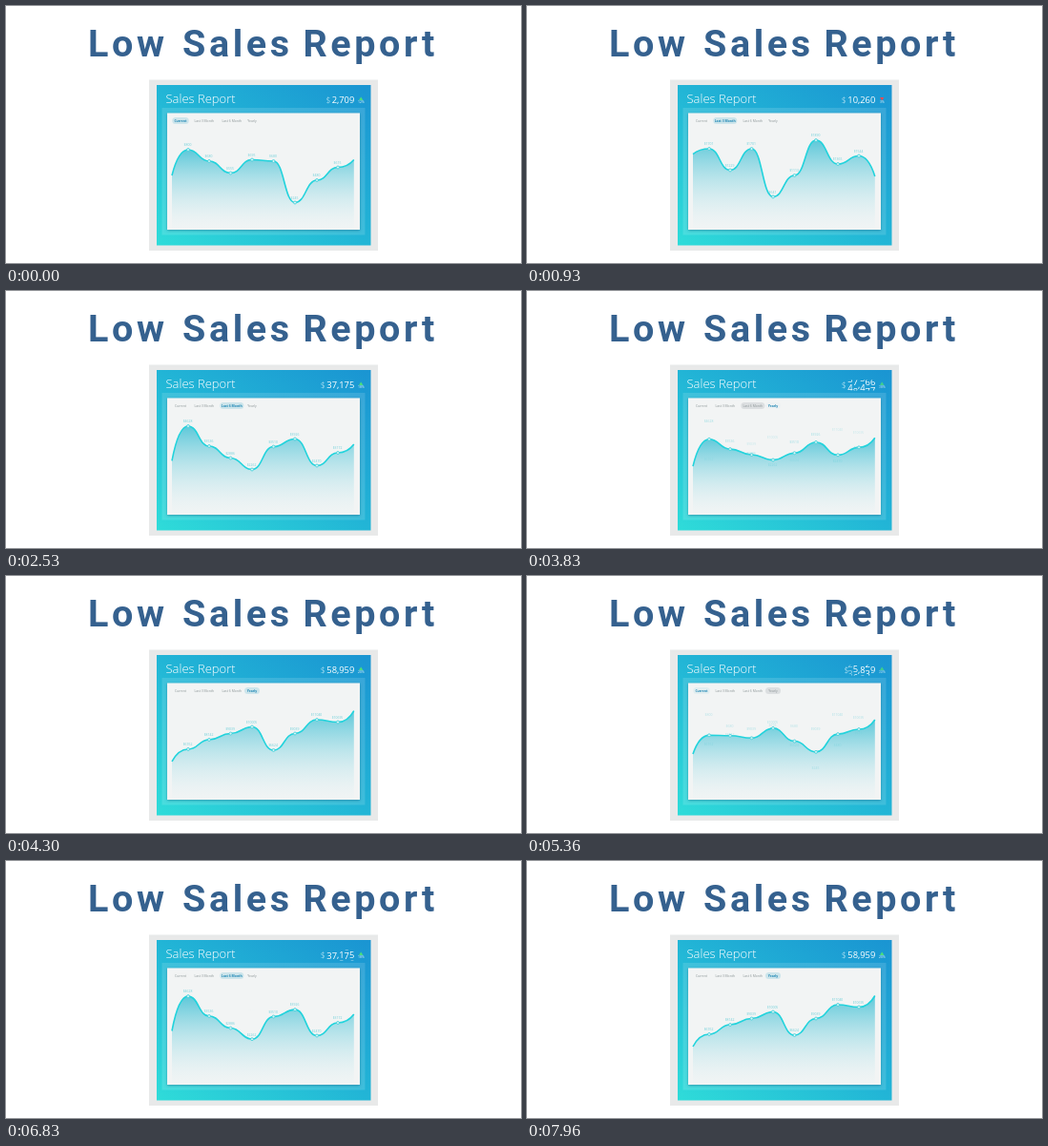
Write an HTML page that moves like this. It is 540 by 270 pixels and loops after 8000 ms.

```html
<!DOCTYPE html>
<html lang="en">
<head>
<meta charset="utf-8">
<title>Low Sales Report</title>
<style>
html, body { margin: 0; width: 100%; height: 100%; overflow: hidden; background: #fff; }
svg { display: block; width: 540px; height: 270px; font-family: "Open Sans", sans-serif; }
.title { font: 700 39.5px Roboto, sans-serif; letter-spacing: 3.6px; fill: #35618f; }
.tab { font-size: 3.4px; text-anchor: middle; fill: #8b9496; }
.tab.on { font-weight: 700; fill: #1e86b4; }
.val { font-size: 3.4px; text-anchor: middle; fill: #6fcfd9; }
.num { font-size: 9.4px; fill: #fff; text-anchor: middle; }
.dot { fill: #d6f4f5; stroke: #3fd0da; stroke-width: .8; }
</style>
</head>
<body>
<svg id="stage" viewBox="0 0 540 270">
  <defs>
    <linearGradient id="panel" x1="0" y1="1" x2="1" y2="0">
      <stop offset="0" stop-color="#2fdcd9"/>
      <stop offset=".5" stop-color="#22b5d6"/>
      <stop offset="1" stop-color="#1a94d2"/>
    </linearGradient>
    <linearGradient id="fill" x1="0" y1="0" x2="0" y2="1">
      <stop offset="0" stop-color="#4cc3d6" stop-opacity=".9"/>
      <stop offset="1" stop-color="#e9f4f6" stop-opacity=".15"/>
    </linearGradient>
    <filter id="shade" x="-10%" y="-10%" width="120%" height="120%">
      <feDropShadow dx="0" dy="1" stdDeviation="1.5" flood-color="#0a5f80" flood-opacity=".5"/>
    </filter>
    <clipPath id="slot"><rect x="334" y="93.5" width="33" height="11"/></clipPath>
  </defs>
  <rect width="540" height="270" fill="#fff"/>
  <g class="title">
    <text x="86" y="53">Low</text>
    <text x="185" y="53">Sales</text>
    <text x="311.5" y="53">Report</text>
  </g>
  <rect x="150" y="77.5" width="240" height="179.5" fill="#e8e9e9"/>
  <rect x="158" y="83" width="224.5" height="168.5" fill="url(#panel)"/>
  <rect x="163.5" y="107" width="213" height="133.5" fill="#fff" opacity=".13"/>
  <rect x="169" y="112.5" width="202" height="122.5" fill="#f2f4f4" filter="url(#shade)"/>
  <text x="167.5" y="101.8" font-size="13" font-weight="300" fill="#fff">Sales Report</text>
</svg>
<script>
const LOOP = 8000, MOVE = 650, BASE = 235, PITCH = 9.5;
const XS = [174, 191, 213, 235.5, 258, 280.5, 303, 326, 348, 364.8];
const STATES = [
  { tab: "Current", x: 183, w: 17.5, total: "02709", scale: 10, pct: "12%",
    ys: [178, 151, 163, 175.5, 161.5, 163, 206.5, 183, 169.5, 161.5] },
  { tab: "Last 3 Month", x: 207.7, w: 25, total: "10260", scale: 21, pct: "3%", down: true,
    ys: [155.5, 150, 172.5, 150, 200.5, 178, 141, 166, 157.5, 179] },
  { tab: "Last 6 Month", x: 236.8, w: 25, total: "37175", scale: 52, pct: "18%",
    ys: [178.5, 142, 163, 175.5, 187.5, 163.5, 155.5, 183.5, 170, 161] },
  { tab: "Yearly", x: 258, w: 16, total: "58959", scale: 138, pct: "20%",
    ys: [195, 182, 172, 165.5, 158.5, 183, 165.5, 151, 153.5, 141.5] }
];
// start time, state to show
const MOVES = [[0, 0], [400, 1], [2000, 2], [3766, 3], [5265, 0], [6400, 2], [7300, 3]];

const stage = document.getElementById("stage");
const mix = (a, b, p) => a + (b - a) * p;
const clamp = v => Math.min(1, Math.max(0, v));
const set = (el, attrs) => { for (const k in attrs) el.setAttribute(k, attrs[k]); };

function add(tag, attrs, parent = stage, text = "") {
  const el = document.createElementNS("http://www.w3.org/2000/svg", tag);
  set(el, attrs);
  el.textContent = text;
  return parent.appendChild(el);
}

const area = add("path", { fill: "url(#fill)" });
const line = add("path", { fill: "none", stroke: "#22d3dc", "stroke-width": 1.6 });
const dots = XS.slice(1, -1).map(x => add("circle", { class: "dot", cx: x, r: 1.5 }));

for (const s of STATES) {
  s.pill = add("rect", { x: s.x - s.w / 2, y: 117, width: s.w, height: 7, rx: 3.5 });
  s.label = add("text", { class: "tab", x: s.x, y: 121.5 }, stage, s.tab);
  s.values = add("g", {});
  for (let i = 1; i < XS.length - 1; i++) {
    const amount = Math.round((231 - s.ys[i]) * s.scale);
    add("text", { class: "val", x: XS[i] - .5, y: s.ys[i] - 3.8 }, s.values, "$" + amount);
  }
  s.icon = add("g", {});
  add("path", { d: s.down ? "M370 96h4.4l-2.2 3.2z" : "M370 99h4.4l-2.2-3.6z",
    fill: s.down ? "#f0484f" : "#4be07a" }, s.icon);
  add("text", { x: 372.4, y: 102.3, "font-size": 3.4, "text-anchor": "middle", fill: "#fff" }, s.icon, s.pct);
}

const dollar = add("text", { y: 102, "font-size": 8.5, "font-weight": 300, fill: "#c9ecf7" }, stage, "$");
const slot = add("g", { "clip-path": "url(#slot)" });
const reels = [339, 344.4, 352, 357.3, 362.7].map(x => {
  const reel = add("g", { class: "num" }, slot);
  for (let d = 0; d < 10; d++) add("text", { x, y: 102.3 + d * PITCH }, reel, d);
  return reel;
});
add("text", { class: "num", x: 348.2, y: 102.3 }, stage, ",");

function curve(ys) {
  const last = XS.length - 1;
  let d = `M${XS[0]} ${ys[0]}`;
  for (let i = 1; i <= last; i++) {
    const [x0, x1, y0, y1] = [XS[i - 1], XS[i], ys[i - 1], ys[i]];
    const w = x1 - x0;
    // the outer pieces are cut off mid-slope, so they meet the edge steeply
    const a = i === 1 ? [x0 + w * .2, mix(y0, y1, .5)] : [x0 + w * .5, y0];
    const b = i === last ? [x1 - w * .2, mix(y1, y0, .5)] : [x1 - w * .5, y1];
    d += `C${a} ${b} ${x1} ${y1}`;
  }
  return d;
}

function render(t) {
  let n = MOVES.length - 1;
  while (MOVES[n][0] > t) n--;
  const from = STATES[MOVES[Math.max(0, n - 1)][1]];
  const to = STATES[MOVES[n][1]];
  const p = n ? 1 - (1 - clamp((t - MOVES[n][0]) / MOVE)) ** 4 : 1;

  const ys = XS.map((_, i) => mix(from.ys[i], to.ys[i], p));
  const d = curve(ys);
  set(line, { d });
  set(area, { d: `${d}V${BASE}H${XS[0]}Z` });
  dots.forEach((dot, i) => set(dot, { cy: ys[i + 1] }));

  for (const s of STATES) {
    const share = s === to ? p : s === from ? 1 - p : 0;
    s.values.style.opacity = share;
    s.icon.style.opacity = share;
    s.pill.style.opacity = s === to ? clamp((p - .3) * 2.5) : clamp(share * 2);
    set(s.pill, { fill: s === to ? "#cde5eb" : "#dcdfe1" });
    s.label.classList.toggle("on", s === to);
  }

  reels.forEach((reel, i) => {
    const digit = mix(+from.total[i], +to.total[i], p);
    set(reel, { transform: `translate(0 ${-digit * PITCH})` });
  });
  const lead = mix(+(from.total[0] > 0), +(to.total[0] > 0), p);
  reels[0].style.opacity = lead;
  set(dollar, { x: mix(335.5, 329.8, lead) });
}

const begin = performance.now();
function tick() {
  render((performance.now() - begin) % LOOP);
  requestAnimationFrame(tick);
}
render(0);
tick();
</script>
</body>
</html>
```
